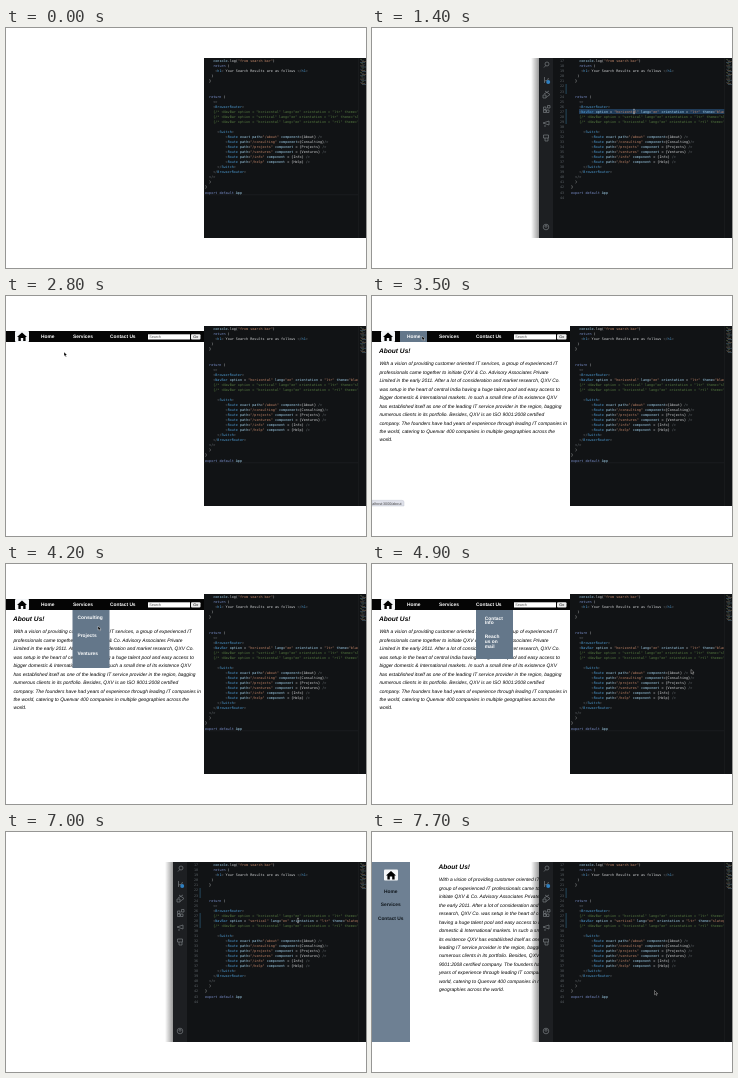
Write an HTML page that moves like this. It is 360 by 240 pixels and loops after 8 s.

```html
<!DOCTYPE html>
<html lang="en">
<head>
<meta charset="utf-8">
<title>Navbar demo</title>
<style>
html, body { margin: 0; width: 360px; height: 240px; overflow: hidden; background: #fff; }
svg { display: block; }
text { white-space: pre; text-rendering: geometricPrecision; font-family: "Liberation Sans", Arial, sans-serif; }
.code { font: 3.42px "DejaVu Sans Mono", monospace; }
.bold { font-size: 4.85px; font-weight: bold; }
.para { font-size: 4.9px; font-style: italic; }
.title { font-size: 6.6px; font-weight: bold; font-style: italic; }
.small { font-size: 3.7px; }
.icon { fill: none; stroke: #777b80; stroke-width: .7; }
</style>
</head>
<body>
<svg id="stage" width="360" height="240" viewBox="0 0 360 240"></svg>
<script>
const SLATE = '#64778a', LOOP = 8000, STEP = 700;
const CHAR = 2.06, ROW = 5.05, LEFT = 199;

const esc = s => s.replace(/&/g, '&amp;').replace(/</g, '&lt;').replace(/>/g, '&gt;');
const rect = (x, y, w, h, fill, extra = '') =>
  `<rect x="${x}" y="${y}" width="${w}" height="${h}" fill="${fill}" ${extra}/>`;
const text = (x, y, s, cls, fill = '#000', extra = '') =>
  `<text x="${x}" y="${y}" class="${cls}" fill="${fill}" ${extra}>${esc(s)}</text>`;
const path = (d, extra = '') => `<path d="${d}" ${extra}/>`;

// ---- editor ----
const navBar = (option, dir, theme) =>
  `<NavBar option = "${option}" lang="en" orientation = "${dir}" theme="${theme}" />`;
const bars = [navBar('horizontal', 'ltr', 'black'), navBar('vertical', 'ltr', 'slategray'),
  navBar('horizontal', 'rtl', 'black')];
const route = (name, eq = ' = ', end = ' />') =>
  `          <Route path="/${name}" component${eq}{${name[0].toUpperCase() + name.slice(1)}}${end}`;

const source = live => [
  '    console.log("from search bar")',
  '    return (',
  '     <h1> Your Search Results are as follows </h1>',
  '   )',
  '  }',
  '', '',
  '  return (',
  '    <>',
  '    <BrowserRouter>',
  ...bars.map((bar, i) => '    ' + (i === live ? bar : `{/* ${bar} */}`)),
  '',
  '      <Switch>',
  route('about', '=').replace('Route', 'Route exact'),
  route('consulting', '=', '/>'),
  ...['projects', 'ventures', 'info', 'help'].map(name => route(name)),
  '      </Switch>',
  '    </BrowserRouter>',
  '  </>',
  '  )',
  '}',
  'export default App'
];

const rules = [
  [/^\{\/\*.*/, '#587d42'],
  [/^"[^"]*"?/, '#c98a6c'],
  [/^(<\/?>?|\/?>)/, '#73797f'],
  [/^(return|export|default)\b/, '#7f96d6'],
  [/^(NavBar|Route|Switch|BrowserRouter|h1)\b/, '#4f9fd8'],
  [/^(option|lang|orientation|theme|exact|path|component|console|App)\b/, '#a5d6f2'],
  [/^(\w+|\s+|.)/, '#d6d8da']
];

function highlight(s) {
  let out = '';
  while (s) {
    const [re, fill] = rules.find(([re]) => re.test(s));
    const token = s.match(re)[0];
    out += `<tspan fill="${fill}">${esc(token)}</tspan>`;
    s = s.slice(token.length);
  }
  return out;
}

const rowY = i => 34.2 + ROW * i;

function activityBar() {
  return rect(167, 30, 14, 180, '#1d1f22') + '<g class="icon">' +
    path('M172 39.500l1.800-2M177 36a2 2 0 1 1-4 0a2 2 0 1 1 4 0') +
    path('M172.500 49v6M172.500 53q4 0 4-3') +
    path('M172 66l5 -3v0M173 63l5 3.500l-4 3M171 67h3v3h-3z') +
    path('M171.500 79h2.500v2.500h-2.500zM171.500 82h2.500v2.500h-2.500zM174.500 82h2.500v2.500h-2.500zM175.500 77.500h2.500v2.500h-2.500z') +
    path('M171 95l6-2v4zM173 97v2') +
    path('M171.500 107h5v3h-5zM173 110v3h3v-3') +
    '<circle cx="174" cy="199" r="2.800"/><circle cx="174" cy="198.300" r="1"/></g>' +
    '<circle cx="176.200" cy="54" r="2" fill="#2f7fc0"/>';
}

function minimap() {
  const tones = ['#4d5a3c', '#48606f', '#6a5a48', '#3d4348'];
  let out = rect(352.5, 30, .4, 180, '#24272a');
  for (let i = 0; i < 24; i++) {
    out += rect(354 + i * 7 % 3, 31 + i * 1.1, 2 + i * 5 % 4, .6, tones[i * 3 % 4]);
  }
  return out;
}

function editor({ wide, live, selected }) {
  const x = wide ? 167 : 198;
  let out = wide ? rect(159, 30, 8, 180, 'url(#shade)') : '';
  out += rect(x, 30, 360 - x, 180, '#111315');
  if (wide) {
    out += activityBar() + rect(193.8, 56, .5, 10, '#3b7ca5') + rect(193.8, 81, .5, 15, '#3b7ca5');
    for (let i = 0; i < 28; i++) {
      out += text(192, rowY(i), `${17 + i}`, 'code', '#5d6368', 'text-anchor="end"');
    }
  } else {
    out += rect(198, 166.7, 154, .4, '#272a2d');
  }
  if (selected) out += rect(207, 81, 145.5, 5, '#203c59');
  out += '<g clip-path="url(#pane)">';
  source(live).forEach((line, i) => {
    const body = line.trimStart(), indent = line.length - body.length;
    out += `<text class="code" x="${LEFT + indent * CHAR}" y="${rowY(i)}">${highlight(body)}</text>`;
  });
  return out + '</g>' + minimap();
}

// ---- web page ----
// "|" breaks lines in the full-width layout, "/" beside the sidebar
const about = 'With a vision of providing customer oriented IT services, a /group of experienced IT |' +
  'professionals came together to /initiate QXV & Co. Advisory Associates Private |Limited in /' +
  'the early 2011. After a lot of consideration and market /research, QXV Co. |was setup in the ' +
  'heart of central India /having a huge talent pool and easy access to |bigger /domestic & ' +
  'International markets. In such a small time of /its existence QXV |has established itself as ' +
  'one of the /leading IT service provider in the region, bagging |/numerous clients in its ' +
  'portfolio. Besides, QXV is an ISO /9001:2008 certified |company. The founders have had /years ' +
  'of experience through leading IT companies in |the /world, catering to Quenvar 400 companies ' +
  'in multiple /geographies across the |world.';

function article(x, y, split, drop) {
  return text(x, y, 'About Us!', 'title') + about.replaceAll(drop, '').split(split)
    .map((line, i) => text(x + .4, y + 12.9 + i * 8.45, line.trim(), 'para')).join('');
}

const house = (x, y) => rect(x, y, 14, 11, '#f4f6f8', 'rx="1"') +
  path(`M${x + 7} ${y + 1.5}l5 4.500h-1.400v4h-2.400v-3h-2.400v3h-2.400v-4h-1.400z`);

const menus = {
  services: [66.5, 58, [['Consulting', 55], ['Projects', 73], ['Ventures', 91]]],
  contact: [104, 49, [['Contact', 55.7], ['Info', 60.3], ['Reach', 73.8], ['us on', 79], ['mail', 84.2]]]
};

function topNav({ home, menu }) {
  let out = rect(0, 35, 198, 11, '#050505') + house(9, 35);
  if (home) out += rect(28, 35, 27, 11, SLATE);
  out += text(35, 42.3, 'Home', 'bold', '#fff') + text(67, 42.3, 'Services', 'bold', '#fff') +
    text(104, 42.3, 'Contact Us', 'bold', '#fff') +
    rect(142, 38.3, 42, 5.2, '#fff') + text(143.2, 42.2, 'Search', 'small', '#555') +
    rect(185, 38.3, 9.5, 5.2, '#eee', 'rx="1"') + text(187.3, 42.2, 'Go', 'small');
  return out;
}

function dropdown(name) {
  const [x, h, items] = menus[name];
  return rect(x, 46, 37, h, SLATE) +
    items.map(([s, y]) => text(x + (name === 'contact' ? 8.8 : 5), y, s, 'bold', '#fff')).join('');
}

const sideNav = () => rect(0, 30, 38, 180, '#6e8093') + house(12, 37.5) +
  [['Home', 60.8], ['Services', 74.3], ['Contact Us', 87.8]]
    .map(([s, y]) => text(18.7, y, s, 'bold', '#10161c', 'text-anchor="middle"')).join('');

const status = (s, end, w) =>
  path(`M0 204.300h${w - 2}q2 0 2 2v3.700H0z`, 'fill="#dfe1ea" stroke="#b9bcc8" stroke-width=".4"') +
  text(end, 208.7, s, 'small', '#444', 'text-anchor="end"');

function page(s) {
  let out = '';
  if (s.nav) out += topNav(s);
  if (s.about) out += article(7, 56.5, '|', '/');
  if (s.menu) out += dropdown(s.menu);
  if (s.side) out += sideNav() + article(66.5, 36.5, '/', '|');
  if (s.status) out += status(...s.status);
  return out;
}

// ---- pointers ----
const arrow = (x, y) => path(`M${x} ${y}v4.200l1-.9l.8 1.600l.7-.3l-.7-1.600h1.300z`,
  'fill="#000" stroke="#fff" stroke-width=".35"');
const beam = (x, y) => path(`M${x - .8} ${y - 2.2}h1.600M${x} ${y - 2.2}v4.400M${x - .8} ${y + 2.2}h1.600`,
  'fill="none" stroke="#ddd" stroke-width=".5"');

const open = { nav: 1, about: 1, live: 0 };
const scenes = [
  {},
  { wide: 1, beam: [240, 88] },
  { wide: 1, live: 0, selected: 1, beam: [262, 83.5] },
  { live: 0, status: ['Waiting for localhost...', 30, 62], arrow: [54.5, 61] },
  { nav: 1, live: 0, arrow: [58, 56] },
  { ...open, home: 1, status: ['localhost:3000/about', 29.5, 32], arrow: [50, 40] },
  { ...open, menu: 'services', arrow: [92, 62] },
  { ...open, menu: 'contact', arrow: [319, 105.5] },
  { ...open, menu: 'contact', wide: 1, beam: [270, 83.5] },
  { ...open, menu: 'contact', wide: 1, live: -1, selected: 1, beam: [292, 88.5] },
  { wide: 1, live: 1, beam: [292, 88.5] },
  { wide: 1, live: 1, side: 1, arrow: [282.5, 158.5] }
];

const defs = `<defs>
  <linearGradient id="shade"><stop offset="0" stop-color="#000" stop-opacity="0"/>
  <stop offset="1" stop-color="#000" stop-opacity=".4"/></linearGradient>
  <clipPath id="pane"><rect x="198" y="30" width="154" height="180"/></clipPath></defs>`;

const stage = document.getElementById('stage');
let shown = -1;

function frame() {
  const step = Math.floor(performance.now() % LOOP / STEP);
  if (step !== shown) {
    const s = scenes[shown = step];
    stage.innerHTML = defs + page(s) + editor(s) +
      (s.arrow ? arrow(...s.arrow) : '') + (s.beam ? beam(...s.beam) : '');
  }
  requestAnimationFrame(frame);
}
frame();
</script>
</body>
</html>
```
